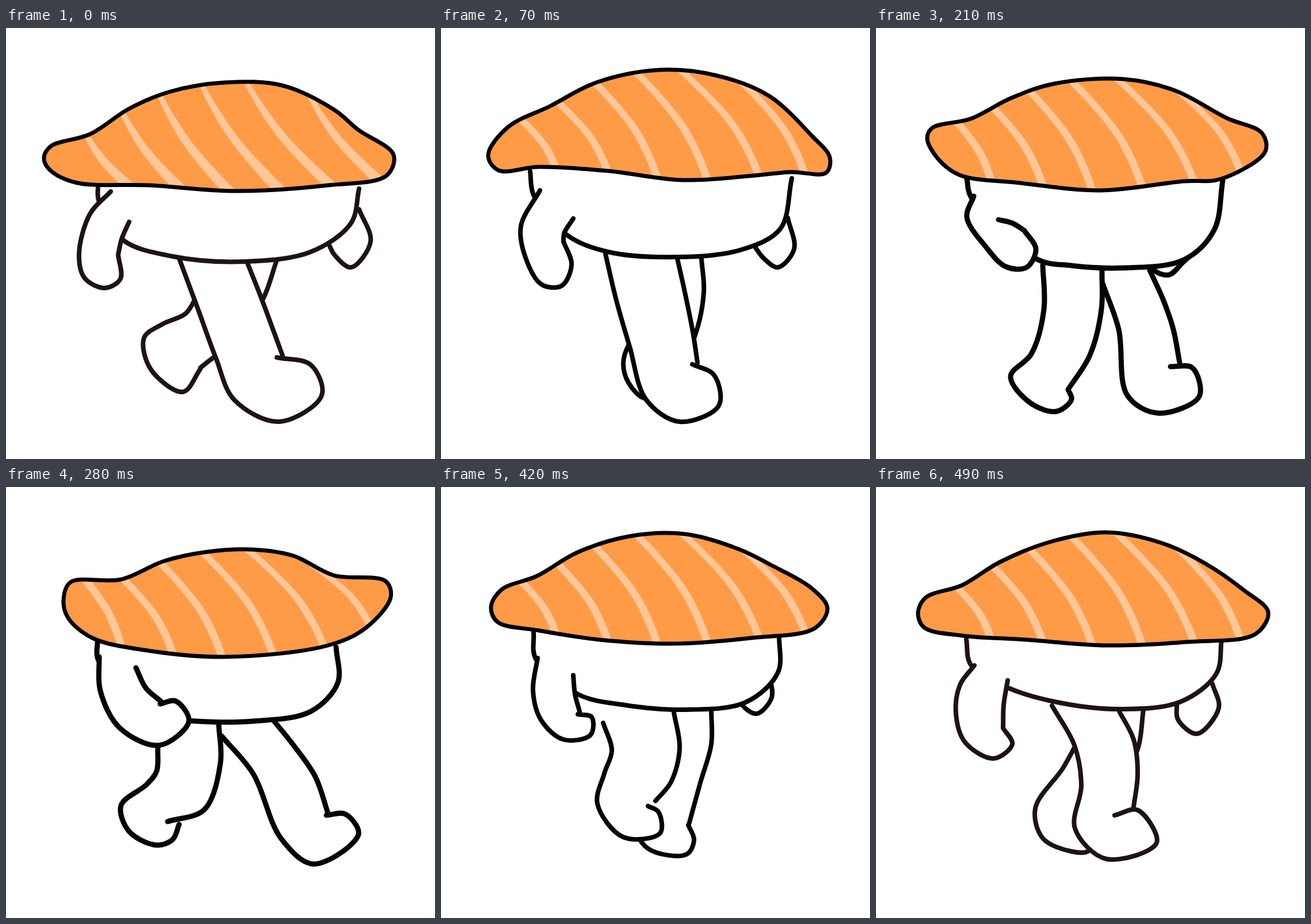
Write an HTML page that moves like this. It is 746x751 px and loops after 0.56 s.

```html
<!DOCTYPE html>
<html lang="en">
<head>
<meta charset="utf-8">
<title>Walking sushi</title>
<style>
  html, body { margin: 0; width: 100%; height: 100%; overflow: hidden; background: #fff; }
  svg { display: block; width: 100%; height: 100%; }
  .pose { visibility: hidden; animation: show 560ms step-end infinite; }
  .limb { fill: #fff; }
  .line { fill: none; stroke-linecap: round; stroke-linejoin: round; }
  .salmon { fill: #ff9b47; }
  .stripe { fill: #ffc697; }
  .rim { stroke: #000; stroke-width: 7; }
  @keyframes show {
    0% { visibility: visible; }
    12.5%, 100% { visibility: hidden; }
  }
</style>
</head>
<body>
<svg id="stage" viewBox="0 0 746 751"></svg>
<script>
const STEP = 70;
const BROWN = '#1d1313', BLACK = '#050404';

// Where the six stripes meet the upper and lower edge of the salmon.
const STRIPE_TOPS = [140, 203, 268, 342, 420, 532];
const STRIPE_FEET = [199, 289, 375, 462, 552, 631];
const EVEN = { top: 17, foot: 14, bend: 0.15, lean: 0 };
const FLARED = { top: 10, foot: 26, bend: -0.1, lean: 12 };

// Parts lie back to front. A limb has a back edge and, after the slash, a front edge.
const PARTS = ['farLeg', 'nearLeg', 'farArm', 'body', 'nearArm'];

const contact = {
  ink: BROWN, width: 8, grain: FLARED,
  salmon: '66,226 78,206 146,185 215,140 285,111 380,95 480,100 570,142 612,177 674,221 662,257 560,274 400,284 250,274 120,269 75,246',
  farLeg: '335,460 313,497 272,516 240,540 252,595 308,634 338,594 / 470,407 447,472 400,540 338,592',
  nearLeg: '302,404 335,493 365,575 397,648 475,686 549,640 530,587 471,574 / 420,410 443,468 466,530 481,571',
  farArm: '614,316 634,372 600,417 571,395 561,376',
  body: '160,274 161,300 203,369 290,398 415,407 530,390 600,340 614,280',
  nearArm: '182,285 146,324 127,395 137,436 172,453 199,437 195,395 / 214,338 201,368 195,395'
};

const rise = {
  ink: BLACK, width: 8, grain: EVEN,
  salmon: '82,222 116,173 190,136 270,95 380,73 480,83 570,118 645,188 676,225 670,252 608,251 545,257 420,265 290,249 170,242 100,248',
  farLeg: '345,530 326,553 317,585 326,618 353,645 380,640 400,620 / 453,403 457,460 442,535 400,620',
  nearLeg: '286,394 305,475 328,555 357,648 415,686 483,658 475,605 437,586 / 411,402 425,465 438,530 446,583',
  farArm: '603,331 614,385 586,417 560,400 547,383',
  body: '155,250 161,291 218,360 290,390 410,399 520,387 590,350 610,262',
  nearArm: '172,283 139,345 147,400 175,447 210,449 227,412 213,372 / 230,332 214,358 213,372'
};

const stride = {
  ink: BLACK, width: 9, grain: EVEN,
  salmon: '89,192 98,174 165,158 235,122 310,97 430,89 520,109 610,157 671,183 677,215 600,263 535,267 390,283 250,270 145,256 107,227',
  farLeg: '394,445 422,525 437,640 490,671 562,642 550,592 512,590 / 476,422 500,475 517,525 528,583',
  nearLeg: '290,413 292,490 270,568 234,607 268,653 314,668 340,647 334,630 / 393,423 392,490 372,570 334,630',
  farArm: '560,385 534,408 510,430 486,424 478,410',
  body: '158,263 165,294 278,402 340,414 430,418 535,404 588,352 603,266',
  nearArm: '170,293 158,330 190,380 226,416 262,417 278,385 258,353 / 213,334 237,340 258,353'
};

const reach = {
  ink: BLACK, width: 9, grain: EVEN,
  salmon: '100,197 112,166 200,161 275,129 350,113 430,109 500,120 570,154 660,164 669,192 625,246 560,276 380,296 240,284 150,263 108,228',
  farLeg: '375,434 430,500 478,612 535,657 613,605 590,570 557,572 / 467,409 500,450 538,505 560,569',
  nearLeg: '264,456 262,495 245,518 200,555 214,600 262,624 290,614 301,588 / 370,415 373,480 345,562 281,583',
  farArm: '545,330 550,355 530,365 510,360 500,330',
  body: '159,271 160,300 250,398 330,408 430,408 530,391 577,341 574,279',
  nearArm: '162,296 164,355 198,420 267,450 318,408 295,373 268,378 / 226,315 243,350 270,374'
};

const lift = {
  ink: BLACK, width: 8, grain: EVEN,
  salmon: '102,198 125,165 185,139 260,98 350,78 450,85 540,119 580,141 648,173 662,205 640,237 540,257 400,271 290,267 190,241 112,225',
  farLeg: '383,465 396,540 392,603 430,648 515,645 510,597 476,579 / 476,391 485,440 483,510 478,577',
  nearLeg: '258,441 250,468 212,478 199,510 235,572 275,587 302,570 305,540 / 388,396 382,470 345,528 299,537',
  farArm: '560,320 555,350 540,360 520,350 515,320',
  body: '166,242 166,290 250,375 320,385 420,390 530,376 580,322 576,253',
  nearArm: '166,286 175,365 210,417 272,436 316,392 288,354 256,373 / 231,320 245,342 262,362'
};

const swing = {
  ink: BROWN, width: 8, grain: EVEN,
  salmon: '73,220 86,193 150,171 215,131 305,95 400,79 495,97 572,133 640,180 682,218 660,256 540,270 400,276 260,266 150,259 84,245',
  farLeg: '350,445 325,490 277,560 290,612 340,635 370,634 385,600 / 465,388 455,457 420,520 385,600',
  nearLeg: '306,381 345,450 357,520 346,595 400,648 488,620 455,563 415,572 / 423,391 448,440 455,500 448,558',
  farArm: '585,343 596,385 558,430 525,405 523,378',
  body: '157,265 165,310 230,350 320,376 425,387 530,374 592,325 601,265',
  nearArm: '171,311 146,345 139,395 155,445 205,473 237,448 221,420 / 229,337 222,380 221,420'
};

const lerp = (a, b, t) => a + (b - a) * t;
const parse = text => text.split(' / ').map(edge => edge.split(' ').map(p => p.split(',').map(Number)));

// Every number in a part halfway between two poses.
function halfway(a, b) {
  const other = b.match(/\d+/g);
  let i = 0;
  return a.replace(/\d+/g, n => (Number(n) + Number(other[i++])) >> 1);
}

function between(a, b) {
  const pose = { ink: BLACK, width: 8, grain: EVEN };
  for (const part of ['salmon', ...PARTS]) pose[part] = halfway(a[part], b[part]);
  return pose;
}

// Bezier handle leaving a towards b, on a centripetal spline coming from p.
function handle(p, a, b) {
  const m = Math.sqrt(Math.hypot(a[0] - p[0], a[1] - p[1]));
  const n = Math.sqrt(Math.hypot(b[0] - a[0], b[1] - a[1]));
  return a.map((v, k) =>
    (m * m * b[k] - n * n * p[k] + (2 * m * m + 3 * m * n + n * n) * v) / (3 * m * (m + n)));
}

function curve(points, closed = false) {
  const n = points.length;
  const mirror = (a, b) => a.map((v, k) => 2 * v - b[k]);
  const at = i => closed ? points[(i + n) % n]
    : points[i] || (i < 0 ? mirror(points[0], points[1]) : mirror(points[n - 1], points[n - 2]));
  let d = '';
  for (let i = 0; i < (closed ? n : n - 1); i++) {
    const a = at(i), b = at(i + 1);
    d += `C${handle(at(i - 1), a, b)} ${handle(at(i + 2), b, a)} ${b}`;
  }
  return d;
}

const outline = (points, closed) => `M${points[0]}${curve(points, closed)}`;

// Closed shape between two edges that run the same way.
function band(left, right) {
  const back = [...right].reverse();
  return `${outline(left)}L${back[0]}${curve(back)}Z`;
}

// Height of the salmon's edge at x, on an arc that runs left to right.
function edgeY(arc, x) {
  const i = arc.findIndex(p => p[0] > x);
  const [a, b] = [arc[i - 1], arc[i]];
  return lerp(a[1], b[1], (x - a[0]) / (b[0] - a[0]));
}

// Tapered, bent stripes that overshoot the salmon, so the clip trims them.
function stripes(salmon, grain) {
  const tip = salmon.reduce((best, p, i) => p[0] > salmon[best][0] ? i : best, 0);
  const upper = salmon.slice(0, tip + 1);
  const lower = [...salmon.slice(tip), salmon[0]].reverse();
  return STRIPE_TOPS.map((top, i) => {
    const foot = STRIPE_FEET[i] + grain.lean;
    const y0 = edgeY(upper, top), y1 = edgeY(lower, foot);
    const side = sign => [-0.15, 0.2, 0.5, 0.8, 1.15].map(t => [
      lerp(top, foot, t + grain.bend * Math.sin(Math.PI * t)) + sign * lerp(grain.top, grain.foot, t) / 2,
      lerp(y0, y1, t)]);
    return `<path d="${band(side(-1), side(1))}"/>`;
  }).join('');
}

function drawPart(text) {
  const edges = parse(text);
  const fill = edges[1] ? band(...edges) : outline(edges[0]);
  return `<path class="limb" stroke="none" d="${fill}"/><path class="line" d="${edges.map(e => outline(e)).join('')}"/>`;
}

function draw(pose, i, all) {
  const [salmon] = parse(pose.salmon);
  const edge = outline(salmon, true) + 'Z';
  return `<g class="pose" style="animation-delay:${(i - all.length) * STEP}ms">
    <clipPath id="cut${i}"><path d="${edge}"/></clipPath>
    <g stroke="${pose.ink}" stroke-width="${pose.width}">${PARTS.map(part => drawPart(pose[part])).join('')}</g>
    <path class="salmon" d="${edge}"/>
    <g class="stripe" clip-path="url(#cut${i})">${stripes(salmon, pose.grain)}</g>
    <path class="line rim" d="${edge}"/>
  </g>`;
}

const walk = [contact, rise, between(rise, stride), stride, reach, lift, between(lift, swing), swing];
document.getElementById('stage').innerHTML = walk.map(draw).join('');
</script>
</body>
</html>
```
